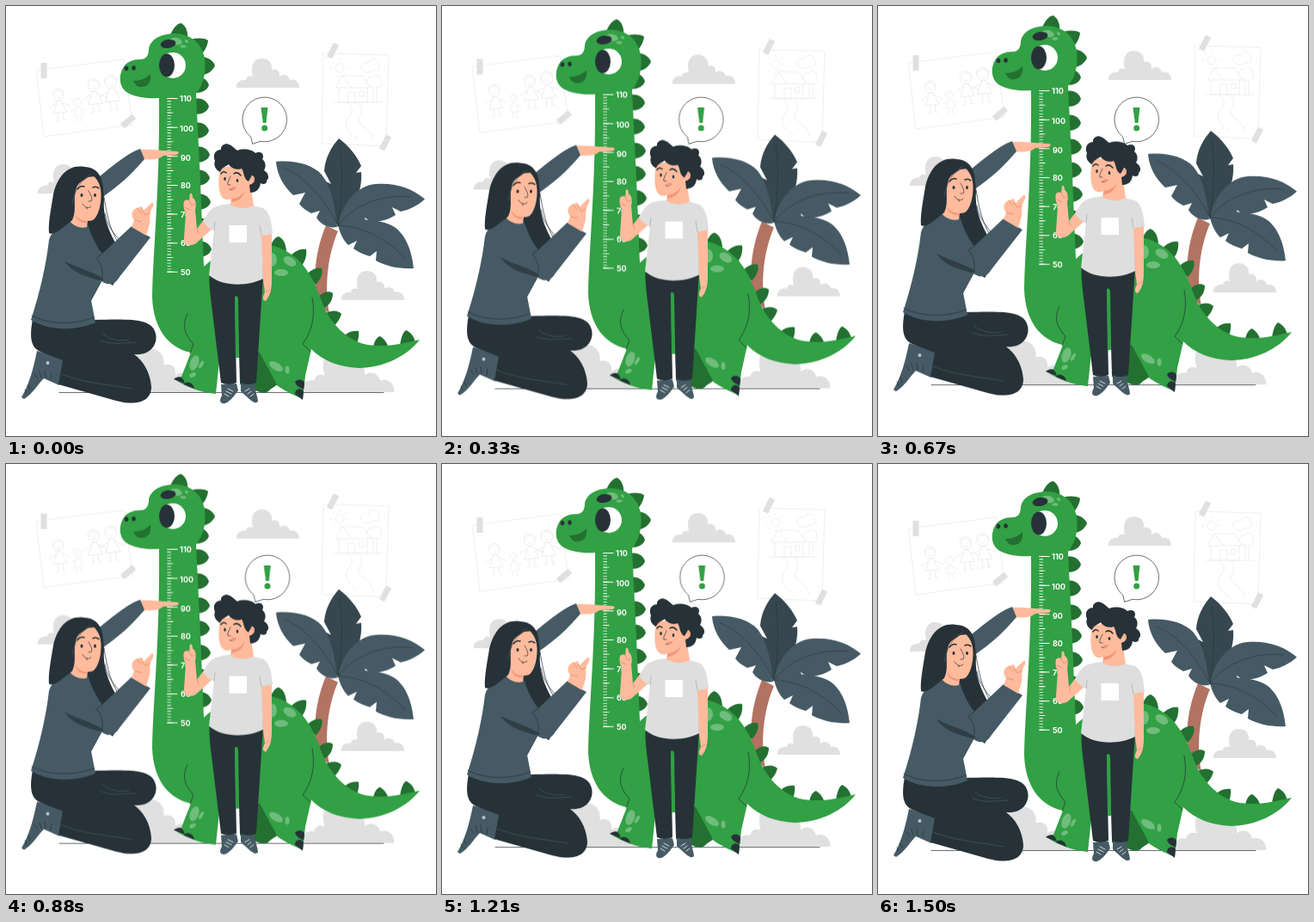
Recreate the animation shown at these times as an HTML page. Size 500 px wide and 500 px high, loop 1.54 s.

```html
<!DOCTYPE html>
<html lang="en">
<head>
<meta charset="utf-8">
<title>Measuring height</title>
<style>
html, body { margin: 0; width: 100%; height: 100%; overflow: hidden; background: #fff; }
svg { display: block; width: 100vw; height: 100vh; }

/* 1.5 s of movement at 24 steps a second, then a short rest */
.float { animation: float 1540ms -5ms infinite; }
.shake { animation: shake 1540ms -5ms linear infinite; }
@keyframes float {
  0% { transform: translateY(0); animation-timing-function: steps(18); }
  48.7% { transform: translateY(-10px); animation-timing-function: steps(18); }
  97.4%, 100% { transform: translateY(0); }
}
@keyframes shake {
  0%, 97.4%, 100% { transform: translateX(0); }
  9.74%, 87.66% { transform: translateX(-1px); }
  19.48%, 77.92% { transform: translateX(2px); }
  29.22%, 48.7%, 68.18% { transform: translateX(-4px); }
  38.96%, 58.44% { transform: translateX(4px); }
}

.dark { fill: #263238; }
.blue { fill: #455a64; }
.navy { fill: #37474f; }
.green { fill: #32a044; }
.deep { fill: #237031; }
.spot { fill: #70bc7c; }
.skin { fill: #ffbb9c; }
.blush { fill: #f4967b; }
.grey { fill: #e0e0e0; }
.white { fill: #fff; }
.line { fill: none; stroke: #263238; stroke-width: .7; stroke-linecap: round; stroke-linejoin: round; }
.brow { fill: none; stroke: #263238; stroke-width: 1.5; stroke-linecap: round; }
.lace { fill: none; stroke: #fff; stroke-width: .8; stroke-linecap: round; }
.crease { stroke: #d98468; }
.seam { stroke: #455a64; }
.sketch { fill: none; stroke: #ebebeb; stroke-width: .8; stroke-linejoin: round; }
.ruler { fill: none; stroke: #fff; }
.nums { fill: #fff; font: 700 9px Inter, "Open Sans", sans-serif; }
</style>
</head>
<body>
<svg viewBox="0 0 500 500">
<defs>
  <path id="cloud" d="M0 34C-1 28 5 24 11 25C12 20 16 20 19 21C16 9 20 0 29 0C38 0 42 6 41 13C47 11 51 15 50 21C54 17 61 19 62 25C69 23 73 28 73 34Z"/>
  <path id="spike" d="M-9 -9C-1 -11 5 -6 7 0C5 6 -1 9 -9 9Z"/>
  <rect id="tape" class="grey" x="-3.5" y="-9" width="7" height="18"/>
  <g id="kid">
    <circle r="6"/>
    <path d="M-6 -1C-9 -10 8 -11 6 0M-2 -1V0M2 -1V0M-2 2Q0 4 2 2M-2 6L-8 20H8L2 6ZM-3 20V29H-6M3 20V29H6M-4 9L-13 14M4 9L13 14"/>
  </g>
</defs>

<g class="float">
  <!-- wall drawings -->
  <g class="sketch">
    <path d="M35 75L137 62L147 138L44 152Z"/>
    <use href="#kid" transform="translate(61 104) rotate(-6)"/>
    <use href="#kid" transform="translate(83 113) rotate(-6) scale(.72)"/>
    <use href="#kid" transform="translate(102 93) rotate(-6) scale(1.05)"/>
    <use href="#kid" transform="translate(122 89) rotate(-6) scale(1.1)"/>
    <path d="M369 55L445 57L442 163L367 160Z"/>
    <circle cx="388" cy="72" r="5"/>
    <path d="M388 64V61M388 80V83M380 72H377M396 72H399M382 66L380 64M394 66L396 64M382 78L380 80M394 78L396 80"/>
    <path d="M383 95L391 81H414L424 95ZM387 95V112H420V95M391 81L402 95M398 112V100H406V112M411 99H416V105H411ZM380 112H438"/>
    <path d="M427 112V94M431 112V94M423 93C417 89 420 82 426 83C431 77 438 83 435 88C440 94 432 98 423 93M413 73C411 67 418 64 421 67C422 60 433 60 433 67C437 71 431 77 427 74C424 79 416 78 413 73Z"/>
    <path d="M397 113C405 119 403 124 398 130C392 139 397 147 409 155M411 113C417 122 411 127 410 133C411 140 425 142 427 156"/>
  </g>
  <use href="#tape" transform="translate(44 75)"/>
  <use href="#tape" transform="translate(142 134) rotate(50)"/>
  <use href="#tape" transform="translate(380 52) rotate(27)"/>
  <use href="#tape" transform="translate(441 159) rotate(27)"/>

  <g class="grey">
    <use href="#cloud" x="268" y="61"/>
    <use href="#cloud" x="390" y="308"/>
    <use href="#cloud" x="37" y="184"/>
    <use href="#cloud" transform="translate(122 398) scale(1.5)"/>
    <use href="#cloud" transform="translate(342 398) scale(1.5)"/>
  </g>
  <path class="line" d="M62 449.5H439"/>

  <!-- palm -->
  <path fill="#b27362" d="M372 255C363 277 355 309 362 345L376 358C370 325 374 290 386 262Z"/>
  <path class="navy" d="M386 257C377 240 372 220 372 204L378 207L370 192C371 177 378 164 387 154C399 163 408 174 413 186L407 194L413 193C415 214 404 240 386 257Z"/>
  <path class="blue" d="M385 257C375 259 366 254 361 246L365 238L355 241C349 238 344 234 341 230L348 217L334 220C323 210 315 196 314 181C335 179 356 184 367 196C379 211 383 235 385 257Z"/>
  <path class="blue" d="M386 255C391 230 407 209 430 207C452 205 473 212 487 224.500C479 232 469 237 459 239L449 234L453 243C444 249 434 251 425 251L417 246L419 253C407 257 396 257 386 255Z"/>
  <path class="blue" d="M386 254C402 247 430 246 450 256C465 265 472 285 474 305C458 306 443 303 430 296L431 285L423 291C416 289 409 286 404 282L408 273L398 278C392 272 388 264 386 254Z"/>
  <path class="line" stroke-opacity=".7" d="M386 255C371 226 349 199 324 189M386 255C391 225 392 190 388 165M386 255C405 230 441 218 472 222M386 255C416 256 445 272 464 294"/>

  <!-- dinosaur spikes -->
  <g class="deep">
    <path d="M190 36C194 26 199 20 204 20C210 24 212 31 211 40Z"/>
    <path d="M215 39C222 37 230 37 235 40C234 48 230 54 225 58Z"/>
    <path d="M228 59C236 60 241 64 243 69C241 75 235 79 229 80Z"/>
    <use href="#spike" x="229" y="92"/><use href="#spike" x="229" y="117"/>
    <use href="#spike" x="229" y="145"/><use href="#spike" x="230" y="173"/>
    <use href="#spike" x="230" y="200"/><use href="#spike" x="231" y="228"/>
    <use href="#spike" x="231" y="256"/><use href="#spike" x="232" y="283"/>
    <path d="M307 283C309 273 313 269 317 268C323 271 326 277 326 288Z"/>
    <path d="M330 291C337 284 343 282 349 283C350 290 348 297 343 303Z"/>
    <path d="M349 313C355 306 361 304 367 305C369 311 366 318 360 324Z"/>
    <path d="M364 337C370 332 376 331 380 334C380 341 377 347 370 351Z"/>
    <path d="M371 358C379 353 386 354 390 358C388 365 384 370 378 375Z"/>
    <path d="M391 388C393 382 400 377 410 378C411 384 409 391 406 396Z"/>
    <path d="M427 399C427 391 431 385 435 384C440 387 444 392 445 400Z"/>
    <path d="M458 396C459 385 462 379 465 377C470 379 474 383 476 391Z"/>
    <path d="M272 395V440L290 447Q302 453 307 446L316 440L309 400Z"/>
  </g>

  <!-- dinosaur body -->
  <path class="green" d="M178 107C164 108 149 106 140 100C132 94 131 83 135 74C139 65 147 62 157 62C163 62 166 57 166 50C168 38 181 32 197 32C216 33 228 44 231 61C233 76 230 91 221 102L226 205L230 303C249 285 282 271 311 279C342 288 356 312 366 341C373 362 391 386 416 393C438 398 460 393 481 388C467 407 438 421 410 421C388 420 369 413 355 399L348 430L345 457C335 453 325 448 316 442L295 403H249L244 451C229 450 208 443 196 434L204 431L215 403C187 397 171 373 170 338C171 283 179 211 178 107Z"/>
  <path class="white" d="M258 404H276L273 436H256Z"/>
  <path class="line" d="M211 358C204 372 208 382 218 393L214 404M356 339C360 360 356 378 345 393L354 402"/>
  <path class="dark" d="M195 434C201 429 206 431 208 439ZM207 440C210 435 218 438 219 445ZM336 437C340 432 348 435 347 440L346 446C342 443 338 443 336 437ZM336 451C336 445 343 443 346 448L345 458Z"/>
  <g class="spot">
    <ellipse cx="309" cy="295" rx="6" ry="8"/>
    <ellipse cx="330" cy="297" rx="8" ry="5" transform="rotate(30 330 297)"/>
    <ellipse cx="320" cy="310" rx="8" ry="4"/>
    <ellipse cx="219" cy="415" rx="5" ry="9" transform="rotate(20 219 415)"/>
    <ellipse cx="227" cy="417" rx="2" ry="5" transform="rotate(30 227 417)"/>
    <ellipse cx="217" cy="429" rx="4" ry="2.5" transform="rotate(-25 217 429)"/>
    <ellipse cx="314" cy="419" rx="9" ry="4.5" transform="rotate(32 314 419)"/>
    <ellipse cx="327" cy="423" rx="2.5" ry="4.5"/>
    <ellipse cx="198" cy="41" rx="7" ry="4" transform="rotate(14 198 41)"/>
    <ellipse cx="206" cy="47" rx="3.5" ry="1.7"/>
    <ellipse cx="210" cy="41" rx="2.5" ry="1.5" transform="rotate(40 210 41)"/>
  </g>
  <circle class="white" cx="194" cy="69" r="15"/>
  <ellipse class="dark" cx="187" cy="69" rx="9" ry="13.5"/>
  <ellipse class="dark" cx="188.5" cy="44" rx="9" ry="5" transform="rotate(-8 188.5 44)"/>
  <ellipse class="dark" cx="140" cy="72.5" rx="2.3" ry="2.7"/>
  <ellipse class="dark" cx="148.5" cy="72" rx="2.3" ry="2.7"/>
  <path class="deep" d="M148 87C157 87 163 84 168 79C169 87 166 94 158 94C153 95 150 91 148 87Z"/>

  <!-- ruler on the neck -->
  <path class="ruler" stroke-width="4.5" stroke-dasharray=".8 2.563" d="M189.700 107V310"/>
  <path class="ruler" stroke-width="7" stroke-dasharray=".8 16.015" d="M191 107V310"/>
  <path class="ruler" stroke-width="12" stroke-dasharray="1 32.63" d="M193.500 107V310"/>
  <g class="nums">
    <text x="202" y="111">110</text><text x="202" y="145.5">100</text>
    <text x="203" y="179.5">90</text><text x="203" y="212">80</text>
    <text x="203" y="246">70</text><text x="203" y="279">60</text>
    <text x="203" y="312.5">50</text>
  </g>

  <!-- woman -->
  <path class="skin" d="M156 167C165 166 178 168 199 169C202 170 201 172 198 173L183 174C177 179 169 179 159 178Z"/>
  <path class="blue" d="M101 204C119 191 137 173 156 166L161 178C146 196 130 210 111 223Z"/>
  <path class="dark" d="M90 189C108 190 114 207 114 225C112 248 123 269 132 283C139 296 141 307 132 312L124 325C110 315 101 290 92 250Z"/>
  <path class="line" d="M114 222C118 250 125 275 142 287C134 270 119 264 115 241"/>
  <path class="blue" d="M36 401L67 410L62 441L44 433C37 440 31 451 21 457L18 455C27 440 32 421 36 401Z"/>
  <path class="line" d="M37 433L33 428M41 432L39 425M46 432L45 424M52 434L53 427M24 450L22 446M28 446L26 441"/>
  <circle cx="48.5" cy="415" r="2" fill="#b8c6cc"/>
  <path class="dark" d="M31 364C27 386 29 397 40 402L66 412L61 440L128 459C150 465 169 461 169 443C168 426 159 412 149 405C168 407 177 393 174 381C170 363 146 364 101 365Z"/>
  <path class="line seam" d="M64 428C92 439 120 440 146 445M110 389C127 395 138 391 152 391M112 381C122 389 135 390 143 388"/>
  <path class="blue" d="M77 248C66 255 53 260 50 272C47 299 40 331 29 365C51 379 84 377 104 368L99 342L111 320C121 327 128 322 132 315L168 269L146 256L112 288C104 278 99 266 95 254C89 254 83 251 77 248Z"/>
  <path fill="#303e46" d="M68 297C80 313 96 314 107 319L114 318C102 309 85 305 68 297Z"/>
  <path class="line" d="M99 342L112 318M30 360C52 372 83 370 102 362M112 288L105 293M106 294C111 302 114 308 111 318"/>
  <path class="skin" d="M146 257L149 249C144 243 147 236 152 235L158 233L160 238L168 230C171 227 173 230 170 235C166 241 168 247 167 253L163 267Z"/>
  <path class="line crease" d="M152 235L157 241M158 237L162 243L167 241M150 249L157 251"/>
  <path class="skin" d="M74 201L105 198C114 212 111 237 104 246C102 249 99 250 95 250L94 257C87 259 79 256 75 251Z"/>
  <path class="blush" d="M80 242C84 248 89 250 95 250V252C87 253 82 249 80 242Z"/>
  <path class="dark" d="M91 187C72 184 60 198 55 219C52 238 49 252 50 264C56 268 69 255 77 249C83 237 77 225 82 211C85 203 95 202 99 195C107 201 110 209 112 221C116 202 107 187 91 187Z"/>
  <path class="line seam" d="M99 195C86 203 80 214 77 230"/>
  <path class="brow" d="M83 213Q87 208 91 210M101 211Q105 209 108 212"/>
  <ellipse class="dark" cx="88" cy="220" rx="1.5" ry="2"/>
  <ellipse class="dark" cx="103.5" cy="220" rx="1.5" ry="2"/>
  <path class="line" d="M96 215C99 220 101 225 99 227L96 227M89 230C92 235 96 236 99 233M94 236V234"/>
</g>

<!-- speech bubble -->
<g class="shake">
  <path class="line white" d="M284.500 152A25.800 25.800 0 1 1 296 157.300L287 160.300Z" style="fill:#fff"/>
  <path class="green" d="M296.500 118H304.500L302.500 136H298.800Z"/>
  <circle class="green" cx="300.7" cy="142" r="3.5"/>
</g>

<g class="float">
  <!-- boy -->
  <path class="skin" d="M296 265H309L309 318C309 328 308 336 302 343C298 342 298 339 301 333L299 318Z"/>
  <path class="skin" d="M234 243L222 259L220 237C222 230 220 224 217 223C217 219 216 217 214 218C213 220 214 223 213 226C206 224 206 229 207 236L209 241L207 270C207 280 216 280 222 275L240 259Z"/>
  <path class="line crease" d="M213 226L216 232L220 230M208 234L214 237M222 259L224 264M302 333L306 330"/>
  <path class="blue" d="M250 440L268 439L270 447C266 452 262 459 255 462C248 463 248 458 251 453ZM273 439L290 440C289 448 293 454 293 460C289 464 283 457 273 448Z"/>
  <path class="lace" d="M254 451L259 454M256 448L262 451M258 445L264 448M278 448L283 445M281 451L285 448M284 454L288 451"/>
  <path class="dark" d="M237 309C235 324 239 345 241 364L250 438Q259 442 268 438L266 338H269L272 438Q282 442 291 438L299 313Z"/>
  <path class="green" d="M266 338C268 336 270 338 270 341L271 409H267Z"/>
  <path fill="#dedede" d="M262 230C249 231 241 233 236 239L229 250C232 255 237 259 242 261L236 313C252 327 282 326 299 317L297 267L310 265C309 250 306 239 299 235L287 232Z"/>
  <path class="line" style="stroke:#aaa" d="M242 261L243 251M297 267L295 255"/>
  <rect class="white" x="259.5" y="255" width="20.5" height="20"/>
  <path class="skin" d="M249 188C247 201 246 215 251 222C254 226 259 226 262 224L261 231C269 236 280 236 288 232L285 213C293 207 292 196 285 198L274 184Z"/>
  <path class="blush" d="M262 224C269 224 275 220 278 214C276 223 269 228 262 228Z"/>
  <path class="dark" d="M249 193C244 191 241 185 243 180C240 174 243 167 250 167C249 162 256 159 259 161C263 162 266 166 269 168C277 165 286 167 290 171C297 168 301 173 298 178C303 182 302 188 300 191C305 194 307 200 303 203C304 207 299 208 296 206C295 213 291 217 284 217L283 208C290 206 291 199 286 197L282 204C276 201 277 193 274 189C267 192 259 186 259 184C256 187 251 187 249 193Z"/>
  <path class="line crease" d="M285 200Q290 200 288 205"/>
  <path class="brow" d="M250 195Q253 191 256 194M265 195Q269 192 273 197"/>
  <ellipse class="dark" cx="254.5" cy="201" rx="1.3" ry="1.9"/>
  <ellipse class="dark" cx="269" cy="203" rx="1.3" ry="1.9"/>
  <path class="line" d="M261 198C259 203 257 206 258 208L261 208M260 213C263 215 266 213 267 211"/>
  <ellipse class="blush" cx="264" cy="212" rx="2.5" ry="2"/>
</g>
</svg>
</body>
</html>
```
